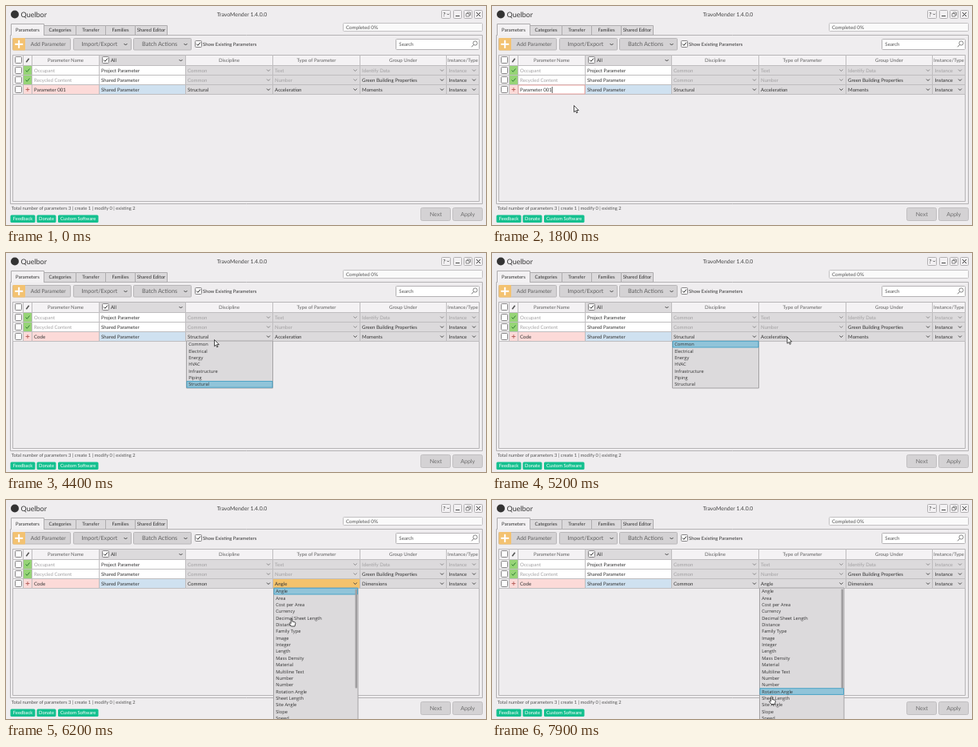
An HTML page with a canvas for the animation above (8000 ms loop, 600 by 274 pixels).

```html
<!DOCTYPE html>
<html lang="en">
<head>
<meta charset="utf-8">
<title>Parameter table</title>
<style>
html, body { margin: 0; height: 100%; overflow: hidden; background: #efedef; }
canvas { display: block; width: 100vw; height: 100vh; }
</style>
</head>
<body>
<canvas id="stage" width="600" height="274"></canvas>
<script>
const ctx = document.getElementById('stage').getContext('2d');
ctx.textRendering = 'geometricPrecision';

const LOOP = 8000, STEP = 100;
const INK = '#333', MUTED = '#a2a0a2', SOFT = '#606060', GRID = '#bfbdbf', COMBO = '#dcdadc';
const COLUMNS = [8.5, 21.5, 32.5, 116.5, 224.5, 333.5, 442.5, 550.5, 591.5];
const ROW_TOP = 74.5, ROW_H = 12, ITEM_H = 8.36;
const DISCIPLINES = ['Common', 'Electrical', 'Energy', 'HVAC', 'Infrastructure', 'Piping', 'Structural'];
const TYPES = ['Angle', 'Area', 'Cost per Area', 'Currency', 'Decimal Sheet Length', 'Distance',
  'Family Type', 'Image', 'Integer', 'Length', 'Mass Density', 'Material', 'Multiline Text', 'Number',
  'Number', 'Rotation Angle', 'Sheet Length', 'Site Angle', 'Slope', 'Speed'];

// Pointer keys: time, x, y
const POINTER = [[300, 122, 158], [700, 97, 106], [1000, 97, 106], [1800, 102.5, 124.5],
  [1900, 103, 124.5], [2700, 176, 119], [3300, 238, 106], [3600, 257, 104], [4200, 257, 104],
  [4600, 264, 113], [4800, 268, 113], [5200, 369, 105], [5500, 372, 104], [5800, 368, 106],
  [6200, 357, 148], [6500, 356, 156], [7100, 352, 228], [7900, 349.5, 245.5]];
// Highlighted entry of the type list: time, index
const TYPE_HOVER = [[5700, 0], [6600, 3], [6800, 5], [7300, 8], [7500, 11], [7700, 15]];

function box(x, y, w, h, fill, stroke, radius = 0) {
  ctx.beginPath();
  ctx.roundRect(x, y, w, h, radius);
  if (fill) { ctx.fillStyle = fill; ctx.fill(); }
  if (stroke) { ctx.strokeStyle = stroke; ctx.lineWidth = 1; ctx.stroke(); }
}

function line(points, color, width = 1) {
  ctx.beginPath();
  points.forEach(([x, y]) => ctx.lineTo(x, y));
  ctx.strokeStyle = color;
  ctx.lineWidth = width;
  ctx.stroke();
}

function text(string, x, y, { size = 6.1, color = INK, align = 'left', font = 'Lato' } = {}) {
  ctx.font = `${size}px ${font}, sans-serif`;
  ctx.textAlign = align;
  ctx.fillStyle = color;
  ctx.fillText(string, x, y);
}

const centered = (string, x, y, size = 6.1, color = SOFT) => text(string, x, y, { size, color, align: 'center' });
const chevron = (x, y, color = '#444') => line([[x - 2, y - 1], [x, y + 1], [x + 2, y - 1]], color);
const tick = (x, y, color) => line([[x - 2.4, y], [x - .7, y + 1.8], [x + 2.5, y - 2]], color);

function checkbox(x, y, checked) {
  box(x, y, 8, 8, '#fff', '#858385', 1);
  if (checked) tick(x + 4, y + 4, '#222');
}

function plus(x, y, arm, color, width) {
  line([[x - arm, y], [x + arm, y]], color, width);
  line([[x, y - arm], [x, y + arm]], color, width);
}

function drawWindow() {
  box(0, 0, 600, 274, '#efedef');
  ctx.beginPath();
  ctx.arc(11, 10.5, 5, 0, 7);
  ctx.fillStyle = '#333';
  ctx.fill();
  text('Quelbor', 18.5, 13.5, { size: 9 });
  centered('TravoMender 1.4.0.0', 295, 12.5, 6.9, '#444');

  [[544.5, 11], [559.5, 10], [572.5, 10], [585.5, 10]].forEach(([x, w]) => box(x, 5.5, w, 10, '#f3f1f3', '#b3b1b3', 1));
  text('?', 546.3, 13, { size: 7 });
  line([[551.3, 9.7], [552.6, 11], [553.9, 9.7]], INK, .8);
  line([[562, 12.5], [567, 12.5]], '#444');
  box(576.5, 8, 4, 3.5, null, '#888');
  box(575, 9.5, 4, 3.5, '#f3f1f3', '#888');
  line([[588, 8], [593, 13]], INK);
  line([[593, 8], [588, 13]], INK);

  box(421.5, 21.5, 174, 10, '#fafafa', '#c3c1c3', 1);
  text('Completed 0%', 425, 28.7, { size: 6.2, color: '#555' });

  box(5.5, 36.5, 590, 211, '#efedef', '#b3b1b3');
  const tabs = ['Parameters', 'Categories', 'Transfer', 'Families', 'Shared Editor'];
  const edges = [6.5, 47.5, 87.5, 124.5, 161.5, 201.5];
  tabs.forEach((label, i) => {
    const top = i ? 24.5 : 22.5;
    box(edges[i], top, edges[i + 1] - edges[i], 36.5 - top, i ? '#dbd9db' : '#f3f1f3', '#aeacae');
    centered(label, (edges[i] + edges[i + 1]) / 2, 32.3, 6, INK);
  });
  line([[7, 36.5], [47, 36.5]], '#f1eff1');
}

function drawToolbar() {
  [8.5, 84.5, 159.5].forEach(x => box(x, 40.5, 72, 14.5, '#d4d2d4', '#b9b7b9', 1));
  box(8.5, 40, 15.5, 15.5, '#f3c271', null, 1);
  plus(16.2, 47.8, 5, '#fff', 2);
  text('Add Parameter', 30.8, 50.2, { size: 6.7, color: SOFT });
  text('Import/Export', 94.4, 50.2, { size: 7.1, color: SOFT });
  text('Batch Actions', 170, 50.2, { size: 7.3, color: SOFT });
  chevron(149.5, 48);
  chevron(224.5, 48);
  checkbox(236.5, 43.5, true);
  text('Show Existing Parameters', 246, 49.8, { size: 5.95 });

  box(487.5, 41.5, 104, 13, '#fff', '#b3b1b3', 1);
  text('Search', 491.3, 50, { size: 6.2, color: '#555' });
  ctx.beginPath();
  ctx.arc(586.5, 46.5, 2.6, 0, 7);
  ctx.strokeStyle = '#666';
  ctx.lineWidth = .8;
  ctx.stroke();
  line([[584.6, 48.5], [582, 51.3]], '#666', .9);
}

function drawHeader() {
  box(8.5, 61.5, 583, 183, '#eeecee', '#b7b5b7');
  box(8.5, 61.5, 583, 13, '#f4f2f4', '#b7b5b7');
  box(117, 62, 107, 12, COMBO);
  COLUMNS.slice(1, -1).forEach(x => line([[x, 61], [x, 74.5]], GRID));
  checkbox(11.5, 63.5);
  checkbox(120.5, 63.5, true);
  text('All', 131, 69.8);
  chevron(218.5, 68);
  line([[25.3, 70.2], [28.7, 65.8]], '#555', 1.6);
  const titles = ['Parameter Name', '', 'Discipline', 'Type of Parameter', 'Group Under', 'Instance/Type'];
  titles.forEach((title, i) => centered(title, (COLUMNS[i + 2] + COLUMNS[i + 3]) / 2, 69.8));
}

function drawRow(index, values, style) {
  const top = ROW_TOP + index * ROW_H, middle = top + 6, base = top + 8.2;
  const fills = ['#f6f5f6', style.mark, style.name, style.kind, COMBO, style.type || COMBO, COMBO, COMBO];
  fills.forEach((fill, i) => box(COLUMNS[i], top, COLUMNS[i + 1] - COLUMNS[i], ROW_H, fill, GRID));
  checkbox(11.5, top + 2);
  if (index < 2) tick(27, middle, '#2e7d32');
  else plus(27, middle, 2.4, '#b45a55', .9);
  values.forEach((value, i) => {
    const off = style.muted.includes(i);
    text(value, COLUMNS[i + 2] + (i === 5 ? 3.2 : 2.6), base, { color: off ? MUTED : INK });
    if (i > 1) chevron([328, 436.5, 545, 585][i - 2], middle, off ? '#888' : '#444');
  });
}

function drawFooter() {
  text('Total number of parameters 3 | create 1 | modify 0 | existing 2', 6.8, 254.7, { size: 5.78, color: '#555' });
  [['Feedback', 5.5, 31], ['Donate', 38.5, 24], ['Custom Software', 65, 50.5]].forEach(([label, x, w]) => {
    box(x, 261.5, w, 9.5, '#14c08f', null, 1.5);
    centered(label, x + w / 2, 268, 5.85, '#fff');
  });
  [['Next', 518.5], ['Apply', 558.5]].forEach(([label, x]) => {
    box(x, 252.5, 37, 16, '#d4d2d4', '#c1bfc1', 2);
    centered(label, x + 18.7, 263, 7, '#6c6c6c');
  });
}

function drawList(items, x, width, selected) {
  box(x, 110, width, items.length * ITEM_H + .5, COMBO, '#a5a3a5');
  items.forEach((item, i) => {
    const top = 110 + i * ITEM_H;
    if (i === selected) box(x + .5, top + .3, width - 1, 7.7, '#91c4d9', '#4ba3c6');
    text(item, x + 2.7, top + 6.2, { size: 5.7, font: 'Open Sans' });
  });
}

function nameAt(t) {
  const full = 'Parameter 001';
  if (t < 1900) return full;
  if (t < 2700) return full.slice(0, Math.max(0, full.length - 2 * ((t - 1900) / 100 + 1)));
  return 'Code'.slice(0, Math.floor((t - 2700) / 150) + 1);
}

function drawNameEditor(t, name) {
  box(33, 99, 83, 11, '#fff', '#f0a8a4');
  text(name, 35.1, 106.7);
  const blinkPhase = (t - 3700 + 4 * 1060) % 1060;
  const x = 35.6 + ctx.measureText(name).width;
  if (blinkPhase < 530) line([[x, 101], [x, 109]], INK, .8);
}

function pointerAt(t) {
  const next = POINTER.findIndex(key => key[0] >= t);
  if (next < 1) return POINTER[0].slice(1);
  const [t0, x0, y0] = POINTER[next - 1], [t1, x1, y1] = POINTER[next];
  const k = (t - t0) / (t1 - t0);
  return [x0 + (x1 - x0) * k, y0 + (y1 - y0) * k];
}

const ARROW = new Path2D('M0 0V8.2L1.9 6.5L3.2 9.3L4.5 8.7L3.2 6H5.8Z');
const HAND = new Path2D('M-.8 1Q0 -.6 .8 1V4L4 4.8Q5 5 4.8 6.5L4 10H-.5L-3 6.5Q-2.6 5.2 -.8 6.4Z');

function drawPointer(t) {
  ctx.save();
  ctx.translate(...pointerAt(t));
  const shape = t >= 5900 ? HAND : ARROW;
  ctx.fillStyle = '#fff';
  ctx.fill(shape);
  ctx.strokeStyle = '#222';
  ctx.lineWidth = .8;
  ctx.stroke(shape);
  ctx.restore();
}

function draw(t) {
  const editing = t >= 1000 && t < 3900;
  const changed = t >= 5300, typeChanged = t >= 5400;
  const name = nameAt(t);
  drawWindow();
  drawToolbar();
  drawHeader();
  const existing = { mark: '#97d477', name: '#fff', kind: '#fff' };
  drawRow(0, ['Occupant', 'Project Parameter', 'Common', 'Text', 'Identify Data', 'Instance'],
    { ...existing, muted: [0, 2, 3, 4, 5] });
  drawRow(1, ['Recycled Content', 'Shared Parameter', 'Common', 'Number', 'Green Building Properties', 'Instance'],
    { ...existing, muted: [0, 2, 3] });
  drawRow(2, [editing ? '' : name, 'Shared Parameter', changed ? 'Common' : 'Structural',
    typeChanged ? 'Angle' : 'Acceleration', typeChanged ? 'Dimensions' : 'Moments', 'Instance'],
    { mark: '#fcdad8', name: '#fcdad8', kind: '#cfe1f0', muted: [], type: t >= 5700 && t < 6600 ? '#f3c26c' : COMBO });
  if (editing) drawNameEditor(t, name);
  drawFooter();
  if (t >= 4000 && t < 5300) drawList(DISCIPLINES, 225.5, 108, t < 4600 ? 6 : 0);
  if (t >= 5700) {
    drawList(TYPES, 334.5, 105.5, TYPE_HOVER.findLast(key => key[0] <= t)[1]);
    box(436.5, 111.5, 2.5, 124, '#a09ea0', null, 1);
  }
  if (t >= 300) drawPointer(t);
}

const start = performance.now();
function animate() {
  const t = (performance.now() - start) % LOOP;
  draw(Math.floor(t / STEP) * STEP);
  requestAnimationFrame(animate);
}
animate();
</script>
</body>
</html>
```
